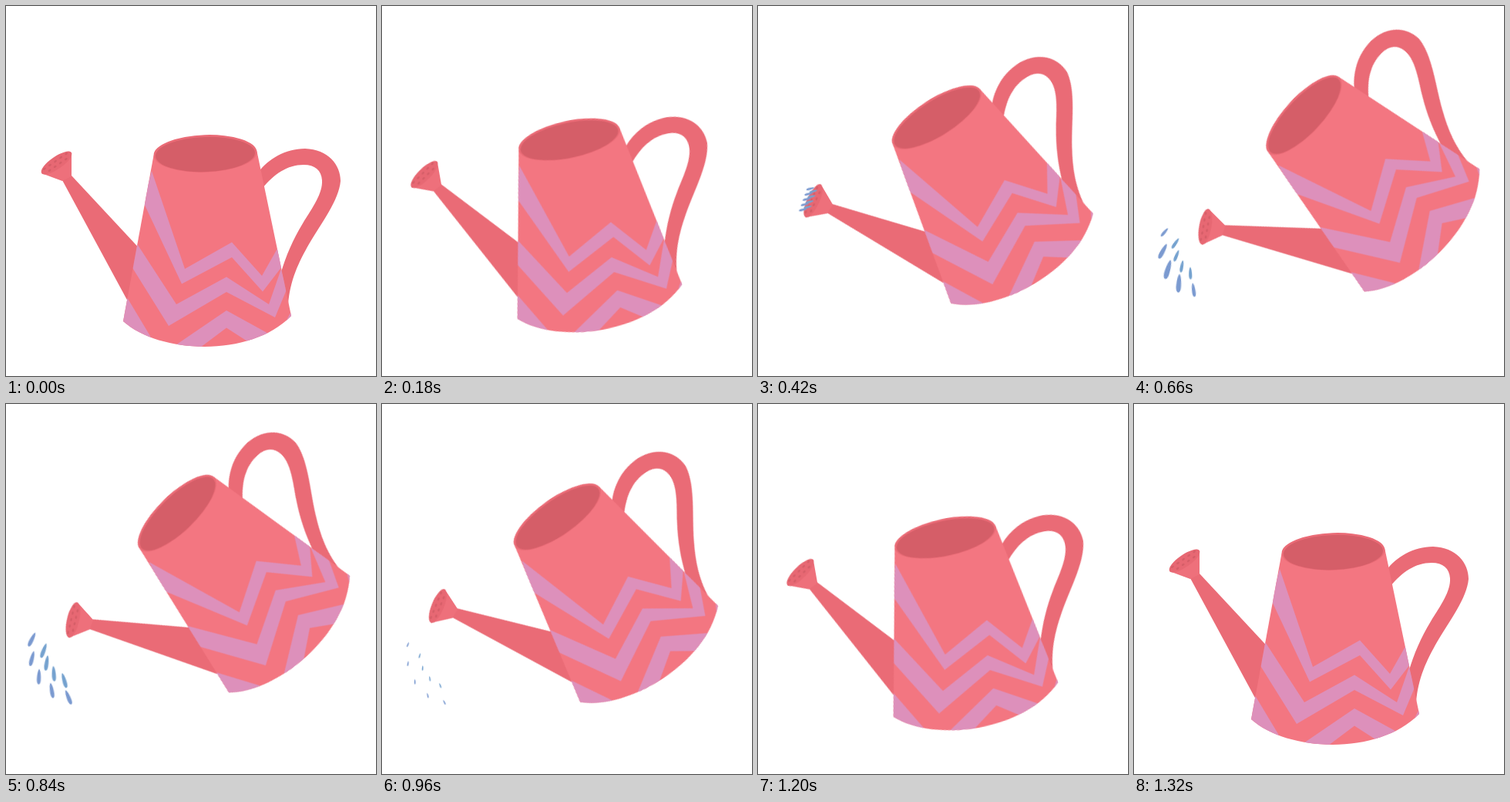
An HTML page for the animation above (1.44 s loop, 480 by 480 pixels).

```html
<!DOCTYPE html>
<html lang="en">
<head>
<meta charset="utf-8">
<title>Watering can</title>
<style>
  html, body { margin: 0; width: 100%; height: 100%; overflow: hidden; background: #fff; }
  svg { display: block; width: 100%; height: 100%; }
  .body { fill: #f37681; }
  .side { fill: #ea6b76; }
  .dark { fill: #d55e68; }
  .stripe { fill: #dd90bb; }

  /* The can turns about the middle of its base, redrawn every 60 ms. */
  #can {
    transform-box: view-box;
    transform-origin: 261px 405.5px;
    animation: pour 1440ms infinite;
  }
  @keyframes pour {
    0% { transform: translate(0, 0) rotate(0deg); animation-timing-function: step-end; }
    12.5% { transform: translate(21.5px, -22px) rotate(-10deg); animation-timing-function: steps(4); }
    29.166% { transform: translate(81.5px, -78px) rotate(-30.5deg); animation-timing-function: steps(4); }
    45.833% { transform: translate(112.5px, -114.5px) rotate(-45deg); animation-timing-function: steps(3); }
    58.333% { transform: translate(106.5px, -107px) rotate(-42.2deg); animation-timing-function: steps(4); }
    75% { transform: translate(64.5px, -55.5px) rotate(-24.1deg); animation-timing-function: steps(2); }
    83.333% { transform: translate(21.5px, -22px) rotate(-10deg); animation-timing-function: steps(2); }
    91.666%, 100% { transform: translate(0, 0) rotate(0deg); }
  }

  #water path {
    transform-box: view-box;
    transform-origin: 0 0;
    animation: drip 1440ms infinite;
  }
  @keyframes drip {
    0% {
      transform: translate(var(--x0), var(--y0)) rotate(75deg) scale(0);
      animation-timing-function: step-end;
    }
    29.166% {
      transform: translate(var(--x0), var(--y0)) rotate(75deg) scale(11);
      animation-timing-function: steps(4);
    }
    45.833% {
      transform: translate(var(--x1), var(--y1)) rotate(var(--turn)) scale(var(--size));
      animation-timing-function: steps(3);
    }
    58.333% {
      transform: translate(var(--x2), var(--y2)) rotate(calc(var(--turn) - 14deg)) scale(20);
      animation-timing-function: steps(3);
    }
    70.833%, 100% {
      transform: translate(var(--x2), calc(var(--y2) + 10px)) rotate(calc(var(--turn) - 20deg)) scale(0);
    }
  }
</style>
</head>
<body>
<svg viewBox="0 0 480 480">
  <defs>
    <path id="shell" d="M191.5 194L152 409C200 452 318 456 370 402L325.5 188.5Z"/>
    <clipPath id="inside"><use href="#shell"/></clipPath>
  </defs>
  <g id="can">
    <path class="side" d="M328 215C340 199 362 185 388 185C418 186 434 206 434 227C432 252 409 282 393 309C380 332 368 356 366 388L357 345C363 325 372 303 385 282C398 261 411 243 410 226C409 213 401 206 386 206C365 206 348 218 333 236Z"/>
    <path class="side" d="M73 226L85 220L180 322L165 396Z"/>
    <path fill="#ee707b" d="M46 217L73 227L85 221V190Z"/>
    <g transform="translate(65.5 203.5) rotate(-34.7)">
      <ellipse rx="23.5" ry="8" fill="#e76873"/>
      <g id="holes" class="dark"></g>
    </g>
    <use href="#shell" class="body"/>
    <g class="stripe" clip-path="url(#inside)">
      <path d="M189 214L232 341L293 306.5L332 350L353 313L358 338L333 370.5L293 326L228 360.5L178 254Z"/>
      <path d="M169 307L221 387L286 351.5L341 387L357 341L364 368L349 404L286 371L211 415L163 338Z"/>
      <path d="M157 378L190 433L145 440Z"/>
      <path d="M217 442L286 395L346 428L324 442L286 417.5L248 446Z"/>
      <path d="M359 417L369 398L382 405Z"/>
    </g>
    <g transform="rotate(-2 258.5 191.5)">
      <ellipse class="side" cx="258.5" cy="191.5" rx="67" ry="24.3"/>
      <ellipse class="dark" cx="258.5" cy="192.5" rx="64.5" ry="22.6"/>
    </g>
  </g>
  <g id="water"></g>
</svg>
<script>
function add(id, tag, attrs) {
  const el = document.createElementNS('http://www.w3.org/2000/svg', tag);
  for (const key in attrs) el.setAttribute(key, attrs[key]);
  return document.getElementById(id).appendChild(el);
}

for (let i = 0; i < 9; i++) {
  const odd = i % 2;
  add('holes', 'ellipse', { cx: (i - 4) * 4.3, cy: odd ? 3 : -2.5, rx: 2.1, ry: 1.3 });

  // Drops fan out from the rose on a wide and a narrow arc in turn.
  const drop = add('water', 'path', {
    d: 'M0-.5C.1-.4 .13-.1 .13.2C.13.6-.12.6-.13.2C-.13-.1-.08-.4 0-.5Z',
    fill: odd ? '#75a2cf' : '#7b9ad0'
  });
  const angle = (12.6 * i - 19) * Math.PI / 180;
  const reach = odd ? 0.65 : 1;
  const x = 84 - 47 * reach * Math.cos(angle);
  const y = 312 + 57 * reach * Math.sin(angle);
  const vars = {
    x0: 71 - 1.2 * i + (odd ? 2 : -3) + 'px',
    y0: 237 + 3.4 * i + 'px',
    x1: x + 'px',
    y1: y + 'px',
    x2: x - 6 + 1.2 * i + 'px',
    y2: y + 12 + 'px',
    turn: 40 - 6 * i + 'deg',
    size: odd ? 16 : 14 + 12 * Math.sin(i * Math.PI / 9)
  };
  for (const name in vars) drop.style.setProperty('--' + name, vars[name]);
}
</script>
</body>
</html>
```
